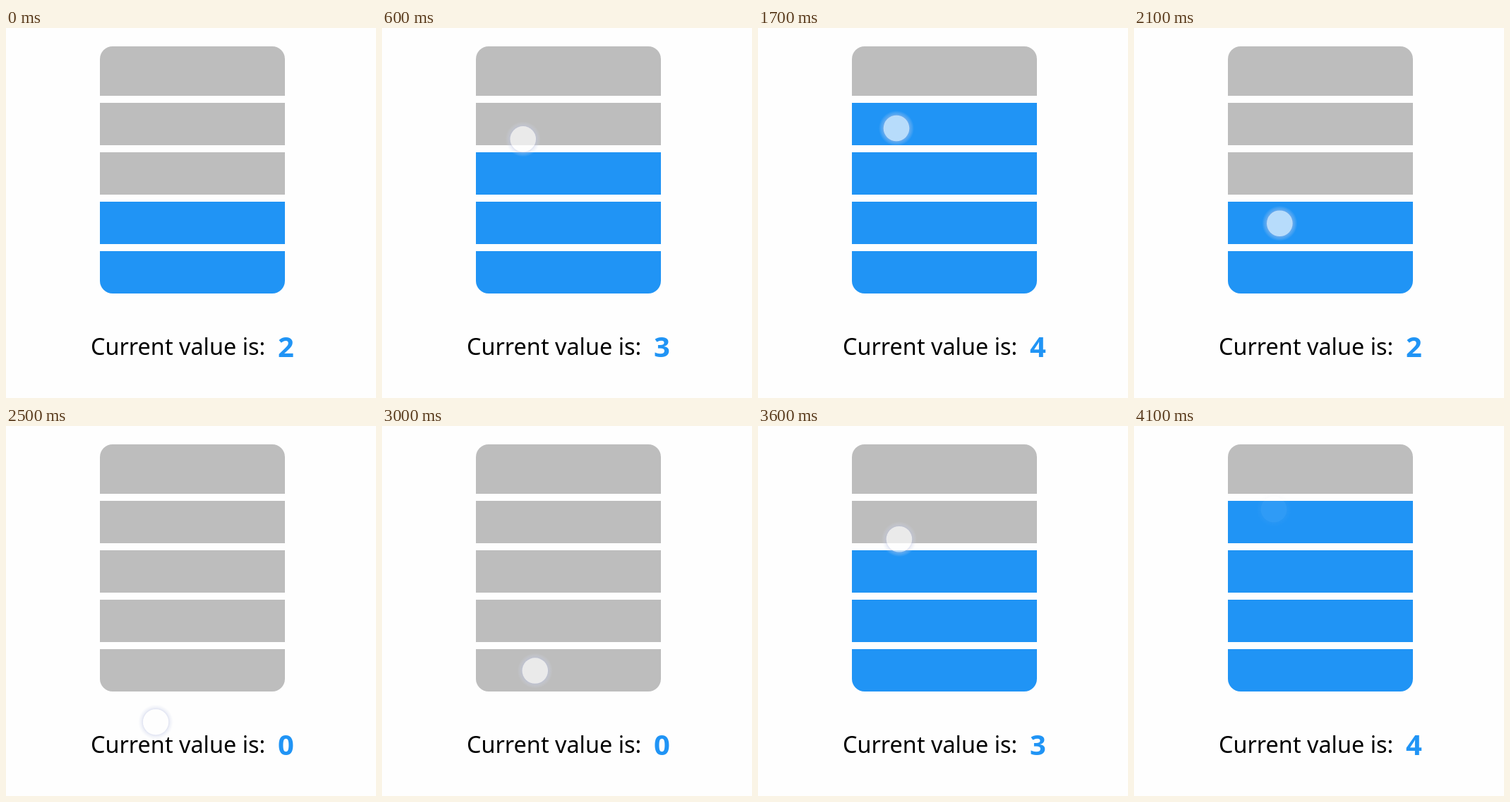
These frames come from a looping animation (524 by 524 pixels, 4.2 s). An HTML page:

```html
<!DOCTYPE html>
<html lang="en">
<head>
<meta charset="utf-8">
<style>
  html, body { margin: 0; width: 100%; height: 100%; overflow: hidden; background: #fefefe; }
  svg { display: block; width: 100vw; height: 100vh; }
  text { font-family: "Noto Sans", sans-serif; }
  #value { font-weight: 700; font-size: 40px; fill: #2094f5; text-anchor: middle; }
</style>
</head>
<body>
<svg viewBox="0 0 524 524">
  <defs>
    <clipPath id="round"><rect x="133" y="26" width="262" height="350" rx="18"/></clipPath>
    <radialGradient id="glow">
      <stop offset=".7" stop-color="#b4bbdf" stop-opacity=".55"/>
      <stop offset=".8" stop-color="#c8cfe8" stop-opacity=".32"/>
      <stop offset="1" stop-color="#d8def0" stop-opacity="0"/>
    </radialGradient>
  </defs>
  <g id="bars" clip-path="url(#round)"></g>
  <text x="120" y="463" font-size="32.4">Current value is:</text>
  <text id="value" x="396.5" y="466"></text>
  <g id="touch">
    <path fill="url(#glow)" fill-rule="evenodd"
      d="M-25 0a25 25 0 1 0 50 0a25 25 0 1 0-50 0M-18 0a18 18 0 1 0 36 0a18 18 0 1 0-36 0"/>
    <circle r="18.3" fill="#fff" fill-opacity=".68"/>
  </g>
</svg>
<script>
const LOOP = 4200, TICK = 100, START = 200, GAP = 300, LAG = 30;
const BARS = 5, PITCH = 70;

// Touch path, one point every GAP ms from START
const pathX = [207, 202, 195, 190, 189, 196, 205, 208, 214, 217, 214, 202, 198, 198];
const pathY = [265, 192, 88, 45, 50, 142, 247, 335, 445, 397, 232, 178, 130, 118];

const $ = id => document.getElementById(id);
const clamp = (v, lo, hi) => Math.min(hi, Math.max(lo, v));

const bars = Array.from({ length: BARS }, (_, i) => {
  const bar = document.createElementNS("http://www.w3.org/2000/svg", "rect");
  const bottom = 376 - i * PITCH;
  const height = i === BARS - 1 ? 70 : 60;
  Object.entries({ x: 133, y: bottom - height, width: 262, height })
    .forEach(([name, v]) => bar.setAttribute(name, v));
  return $("bars").appendChild(bar);
});

// Catmull-Rom interpolation
function along(points, time) {
  const last = points.length - 1;
  const pos = clamp((time - START) / GAP, 0, last);
  const i = Math.min(Math.floor(pos), last - 1), u = pos - i;
  const [a, b, c, d] = [-1, 0, 1, 2].map(k => points[clamp(i + k, 0, last)]);
  return b + u / 2 * (c - a + u * (2 * a - 5 * b + 4 * c - d + u * (3 * (b - c) + d - a)));
}

function draw(time) {
  const value = clamp(Math.floor((430 - along(pathY, time - LAG)) / PITCH), 0, BARS);
  bars.forEach((bar, i) => bar.setAttribute("fill", i < value ? "#2094f5" : "#bdbdbd"));
  $("value").textContent = value;

  const fadeIn = clamp((time - 100) / 200, 0, 1);
  const fadeOut = clamp((4120 - time) / 200, 0, 1);
  $("touch").setAttribute("opacity", time < START ? 0 : Math.min(fadeIn, fadeOut));
  $("touch").setAttribute("transform", `translate(${along(pathX, time)} ${along(pathY, time)})`);
}

function frame() {
  draw(Math.floor(performance.now() % LOOP / TICK) * TICK);
  requestAnimationFrame(frame);
}
frame();
</script>
</body>
</html>
```
